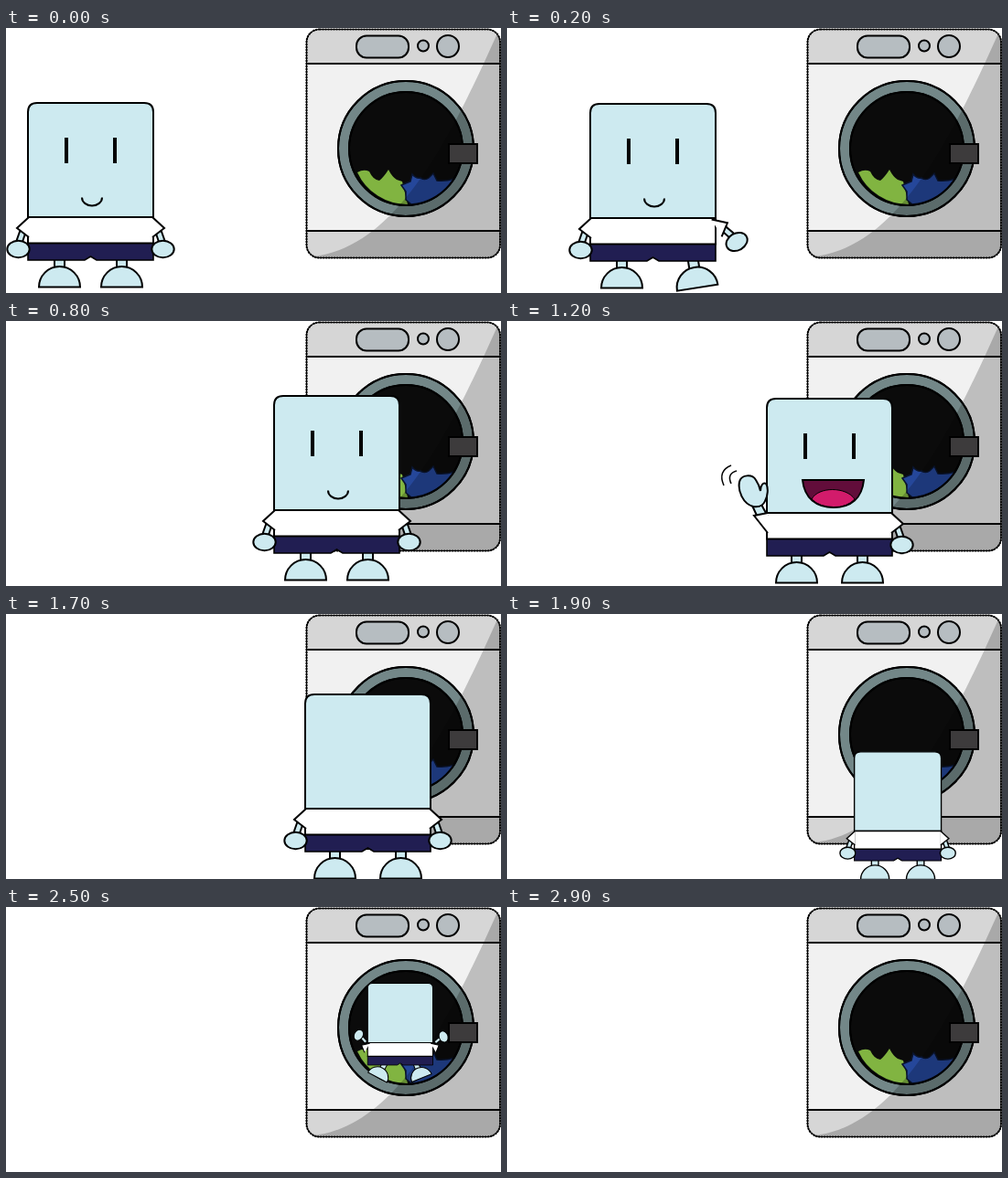
These frames come from a looping animation (541x290 px, 3.1 s). An HTML page:

```html
<!DOCTYPE html>
<html lang="en">
<head>
<meta charset="utf-8">
<title>Into the washer</title>
<style>
  html, body { margin: 0; width: 100%; height: 100%; overflow: hidden; background: #fff; }
  svg { display: block; width: 541px; height: 290px; }
  .line { fill: none; stroke: #000; stroke-width: 2; }
  .skin { fill: #cdeaf0; stroke: #000; stroke-width: 2; }
  .cloth { fill: #fff; stroke: #000; stroke-width: 2; }
  .pants { fill: #211e52; stroke: #000; stroke-width: 1.6; }
</style>
</head>
<body>
<svg viewBox="0 0 541 290">
  <g stroke="#000" stroke-width="2">
    <clipPath id="case"><rect x="328.5" y="1.5" width="211.5" height="250" rx="14"/></clipPath>
    <g clip-path="url(#case)">
      <path fill="#f1f1f1" stroke="none" d="M328 0h213v253H328z"/>
      <path fill="#d6d6d6" d="M326 -2h217V39H326zM326 222h217v34H326z"/>
    </g>
    <rect x="383" y="8.500" width="57" height="24" rx="11" fill="#b6bdc1"/>
    <circle cx="456" cy="19.500" r="6" fill="#b6bdc1"/>
    <circle cx="483" cy="20" r="12" fill="#b6bdc1"/>
    <circle cx="437" cy="132" r="74" fill="#738788"/>
    <circle cx="437" cy="132" r="62" fill="#0b0b0b"/>
    <path fill="#81b441" stroke="none" d="M384 158Q391 154 397 157Q401 166 408 167Q413 163 418 155Q422 163 427 166L433 168L439 193A60 60 0 0 1 384 158z"/>
    <path fill="#25479a" stroke="#0a1530" stroke-width="1.500" d="M432 172L442 168L444 160Q448 165 453 164Q458 167 462 164L467 159L471 167Q480 168 490 165A62 62 0 0 1 443 193L437 188L437 179z"/>
    <path clip-path="url(#case)" fill="#000" fill-opacity=".21" stroke="none" d="M537 6C490 110 430 240 336 250V253H541V0z"/>
    <circle class="line" cx="437" cy="132" r="74"/>
    <circle class="line" cx="437" cy="132" r="62"/>
    <rect x="484" y="127" width="31" height="21" fill="#3d3b3c"/>
    <rect class="line" x="328.500" y="1.500" width="211.500" height="250" rx="14" style="stroke-width:1.2"/>
    <rect class="line" x="328.500" y="1.500" width="211.500" height="250" rx="14" stroke-dasharray="2 1"/>
  </g>
  <g id="actor"></g>
</svg>
<script>
const LOOP = 3100;
const actor = document.getElementById('actor');

const neutral = { legs: [0, 0], arms: [0, 0], stride: [0, 0], face: 'smile' };
const walk = { ...neutral, legs: [0, 9], arms: [0, 30], stride: [0, 10] };
const greet = { ...neutral, stride: [2, 2], face: 'laugh' };
const back = { ...neutral, stride: [2, 2], face: '' };
const leap = { ...back, legs: [28, 22], arms: [120, 111], stride: [0, 0] };

// Each pose holds until the next one starts.
const steps = [
  { t: 0, x: 0, y: 0, ...neutral },
  { t: 200, x: 67, y: 1, ...walk },
  { t: 400, x: 113, y: 0, ...neutral },
  { t: 600, x: 177, y: 1, ...walk },
  { t: 800, x: 269, y: 0, ...neutral },
  { t: 1000, x: 260, y: 3, ...greet, wave: -35 },
  { t: 1200, x: 260, y: 3, ...greet, wave: 0 },
  { t: 1700, x: 303, y: 6, ...back },
  { t: 1900, x: 363, y: 94, size: .693, ...back },
  { t: 2100, x: 368, y: 50.7, size: .67, ...back, shadow: [430, 268.5] },
  { t: 2300, x: 375.4, y: 21.2, size: .693, ...leap, shadow: [441.5, 238] },
  { t: 2500, x: 382.8, y: 40.9, size: .52, ...leap },
  { t: 2700, x: 399, y: 73, size: .35, ...leap },
  { t: 2900 }
];

const faces = {
  '': '',
  smile: '<path class="line" d="M83 185.500a11 9 0 0 0 22 0"/>',
  laugh: `<path d="M63 171H130C128 191 116 201 97 201C78 201 65 191 63 171z" fill="#620d3a"/>
    <path d="M73 192C80 178 111 178 120 192Q111 201 97 201Q82 201 73 192z" fill="#d21b6b" stroke="#000"/>
    <path class="line" d="M63 171H130C128 191 116 201 97 201C78 201 65 191 63 171z"/>`
};
const eyes = '<path d="M66 120v28M119 120v28" stroke="#000" stroke-width="4"/>';

// Limbs are drawn for the left side; the right side is mirrored.
const onSide = (i, shape) => i ? `<g transform="translate(185) scale(-1 1)">${shape}</g>` : shape;

const leg = (angle, stride) => `
  <g transform="translate(${-stride}) rotate(${angle} 58.500 254)">
    <path class="skin" d="M53 250h11v14H53z"/>
    <path class="skin" d="M36 283.500a22.500 22.500 0 0 1 45 0z"/>
  </g>`;

const arm = angle => `
  <g transform="rotate(${angle} 24 214)">
    <path class="skin" d="M16 220L10 237h7L22 222z"/>
    <ellipse class="skin" cx="13.500" cy="242" rx="12.200" ry="9.300"/>
  </g>
  <path class="cloth" transform="rotate(${Math.min(angle, 30)} 24 214)" d="M25 207L12 219L25 229"/>`;

const wavingArm = angle => `
  <g transform="rotate(${angle} 24 217) translate(-260 -3)">
    <path class="skin" d="M268 202L274 215L284 212L277 199z"/>
    <path class="skin" d="M269 203C258 200 252 186 254 176C256 168 268 167 272 174Q276 180 277 186C277 180 280 176 283 178C286 182 285 192 282 197C280 202 275 204 269 203z"/>
    <path class="cloth" d="M285 210L270 213L285 232"/>
  </g>
  ${angle ? '' : '<path class="line" style="stroke-width:1.5" d="M-15 155Q-30 161 -23 177M-9 161Q-20 164 -15 175"/>'}`;

function figure(p) {
  if (!p.face && p.face !== '') return '';
  const shadow = p.shadow
    ? `<ellipse cx="${p.shadow[0]}" cy="${p.shadow[1]}" rx="27" ry="5.500" fill="#5b595a"/>` : '';
  const legs = p.legs.map((a, i) => onSide(i, leg(a, p.stride[i]))).join('');
  const arms = p.arms.map((a, i) =>
    onSide(i, !i && p.wave !== undefined ? wavingArm(p.wave) : arm(a))).join('');
  return `${shadow}<g transform="translate(${p.x} ${p.y}) scale(${p.size || 1})">
    ${legs}
    <path class="skin" d="M24 207V92q0-10 10-10h117q10 0 10 10V207z"/>
    <path class="pants" d="M24 235H161V254H99l-6.500-4-6.500 4H24z"/>
    <path class="cloth" d="M24 207H161V235.500H24z"/>
    ${p.face && eyes}${faces[p.face]}
    ${arms}</g>`;
}

let shown;
function draw() {
  const now = performance.now() % LOOP;
  const pose = steps.findLast(p => p.t <= now);
  if (pose !== shown) actor.innerHTML = figure(shown = pose);
  requestAnimationFrame(draw);
}
draw();
</script>
</body>
</html>
```
